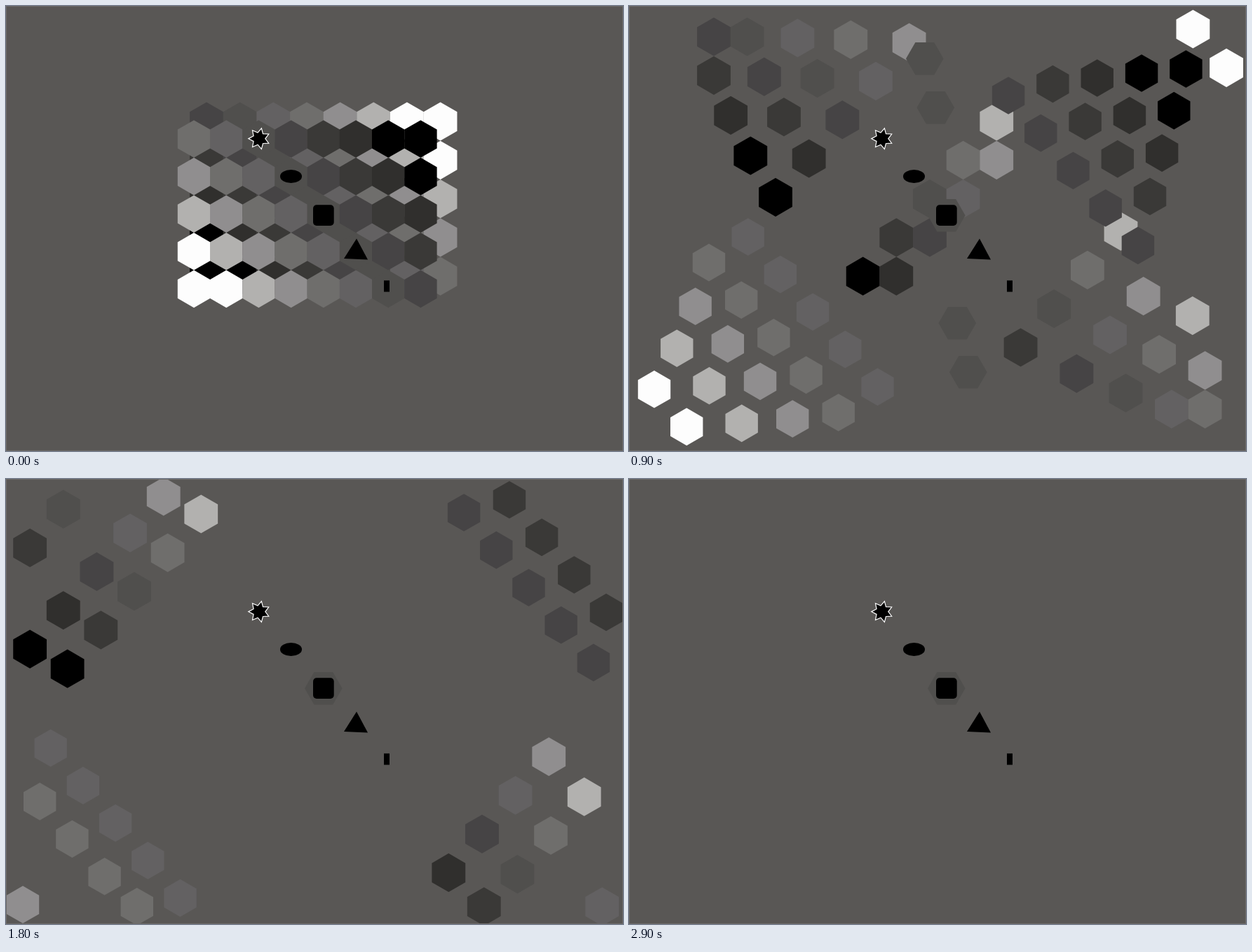
Write an HTML page with a canvas that moves like this. It is 880 px wide and 636 px high and loops after 3000 ms.

```html
<!DOCTYPE html>
<html lang="en">
<head>
<meta charset="utf-8">
<title>Scattering hexagons</title>
<style>
  html, body { margin: 0; width: 100%; height: 100%; overflow: hidden; background: #595755; }
  canvas { display: block; }
</style>
</head>
<body>
<canvas id="stage" width="880" height="636"></canvas>
<script>
const ctx = document.getElementById('stage').getContext('2d');
const LOOP = 3000, STEP = 100, W = 880, H = 636;
const SPREAD = 900, SETTLE = 1300, RUSH = 2200;
const SHADES = ['#fdfdfd', '#b2b1af', '#908e8f', '#6f6e6c', '#636162',
                '#504f4d', '#464445', '#3a3937', '#302f2d', '#000'];

// Each corner pulls diagonal ranks of cells outwards. An offset runs from the
// innermost rank to the outermost as [inner, outer, bend], for x and for y.
// mid is reached at SPREAD, far at SETTLE; drift is the speed per step after that.
const CORNERS = {
  topLeft: { mid: [[0, -165, 0.55], [0, -121, 0.05]], far: [[-216, -310, 2], [-90, -139, 0.4]], drift: [-6, -5] },
  topRight: { mid: [[134.5, 203, 1], [-62, -100, 0.6]], far: [[191.5, 266, 1], [-101, -174, 1]], drift: [11, -8.2] },
  bottomLeft: { mid: [[-144.5, -232, 1.6], [140, 197, 0.32]], far: [[-183, -245, 1], [177, 268, 1]], drift: [-13.5, 3.5] },
  bottomRight: { mid: [[0, 202, 0.32], [0, 190, 0.45]], far: [[190, 280, 2.5], [134, 221, 0.3]], drift: [12, 8.5] }
};

const clamp = (v, lo, hi) => Math.min(hi, Math.max(lo, v));
const lerp = (a, b, k) => a + (b - a) * k;

function pull(name, rank) {
  const { mid, far, drift } = CORNERS[name];
  const u = clamp((rank - 1) / 4, 0, 1);
  const at = ramps => ramps.map(([inner, outer, bend]) => lerp(inner, outer, u ** bend));
  const speed = Math.max(1, rank - 1);
  return { mid: at(mid), far: at(far), drift: drift.map(v => v * speed) };
}

// The middle diagonal swings into a column and leaves by the top and bottom.
function swing(row) {
  const j = row - 2, side = Math.sign(j);
  const mid = [-30.7 * j, 2 + 84 * side + 16.4 * j];
  return { start: 500, mid, far: [mid[0], mid[1] + 135 * side], drift: [0, 34 * side], turns: true };
}

function frontMotion(col, row) {
  const d = col - row - 2, rank = Math.abs(d);
  if (!d) return swing(row);
  return { start: Math.max(0, 500 - 100 * rank), ...pull(d < 0 ? 'bottomLeft' : 'topRight', rank) };
}

function backMotion(col, row) {
  if (col - row > 5) return { start: 0, mid: [232.5, -132], far: [330, -190], drift: [0, 0] };
  const sum = col + row, left = sum < 6;
  const rank = left ? 6 - sum : sum - 5;
  return { start: 400 + 450 / rank, ...pull(left ? 'topLeft' : 'bottomRight', rank) };
}

function makeLayer(x0, y0, dx, dy, radius, level, motion) {
  return Array.from({ length: 40 }, (_, i) => {
    const col = i % 8, row = Math.floor(i / 8), d = level(col, row);
    const shade = clamp(d, -5, 4) + 5;
    // White cells go early, the one in the corner first.
    const life = shade ? LOOP : d === -6 ? 700 : 1200;
    return { x: x0 + col * dx, y: y0 + row * dy, radius, shade, life, ...motion(col, row) };
  });
}
const cells = [
  ...makeLayer(286, 165, 47.65, 55.3, 27.6, (c, r) => r + 1 - c, backMotion),
  ...makeLayer(268, 190, 46.2, 53.6, 26.8, (c, r) => c - r - 2, frontMotion)
];

function offset({ start, mid, far, drift }, t, axis) {
  if (t < SPREAD) return mid[axis] * clamp((t - start) / (SPREAD - start), 0, 1);
  if (t < SETTLE) return lerp(mid[axis], far[axis], (t - SPREAD) / (SETTLE - SPREAD));
  const rush = Math.max(0, t - RUSH) / STEP;
  return far[axis] + drift[axis] * ((t - SETTLE) / STEP + rush * rush / 2);
}

// Cells stop at the edge of the stage and vanish once pushed well past it.
function place(cell, t) {
  if (t >= cell.life) return null;
  const x = cell.x + offset(cell, t, 0), y = cell.y + offset(cell, t, 1);
  const px = clamp(x, 24, W - 24), py = clamp(y, 25, H - 25);
  return Math.max(Math.abs(x - px), Math.abs(y - py)) > 20 ? null : [px, py];
}

function radial(x, y, count, angle, radiusAt) {
  ctx.beginPath();
  for (let i = 0; i < count; i++) {
    const a = angle + i * 2 * Math.PI / count, r = radiusAt(i);
    ctx.lineTo(x + r * Math.cos(a), y + r * Math.sin(a));
  }
  ctx.closePath();
}

function drawShapes() {
  ctx.fillStyle = '#000';
  radial(361, 189.6, 14, Math.PI, i => i % 2 ? 8.8 : 15.2);
  ctx.fill();
  ctx.strokeStyle = '#fff';
  ctx.lineWidth = 1.2;
  ctx.stroke();
  ctx.beginPath();
  ctx.ellipse(406.5, 243.5, 15.5, 9.5, 0, 0, 2 * Math.PI);
  ctx.fill();
  ctx.beginPath();
  ctx.roundRect(438, 284.2, 29.7, 29.7, 5);
  ctx.fill();
  ctx.beginPath();
  ctx.moveTo(500, 332.5);
  ctx.lineTo(516, 362.5);
  ctx.lineTo(482, 361);
  ctx.fill();
  ctx.fillRect(539, 392.3, 8, 16.2);
}

function draw(t) {
  ctx.fillStyle = '#595755';
  ctx.fillRect(0, 0, W, H);
  for (const cell of cells) {
    const pos = place(cell, t);
    if (!pos) continue;
    const turn = cell.turns ? clamp((t - 500) / 400, 0, 1) * Math.PI / 6 : 0;
    ctx.fillStyle = SHADES[cell.shade];
    radial(...pos, 6, turn - Math.PI / 2, () => cell.radius);
    ctx.fill();
  }
  drawShapes();
  ctx.strokeStyle = '#6c6a68';
  ctx.lineWidth = 1;
  ctx.strokeRect(0.5, 0.5, W - 1, H - 1);
}

function tick() {
  const t = performance.now() % LOOP;
  draw(Math.floor(t / STEP) * STEP);
  requestAnimationFrame(tick);
}
tick();
</script>
</body>
</html>
```
